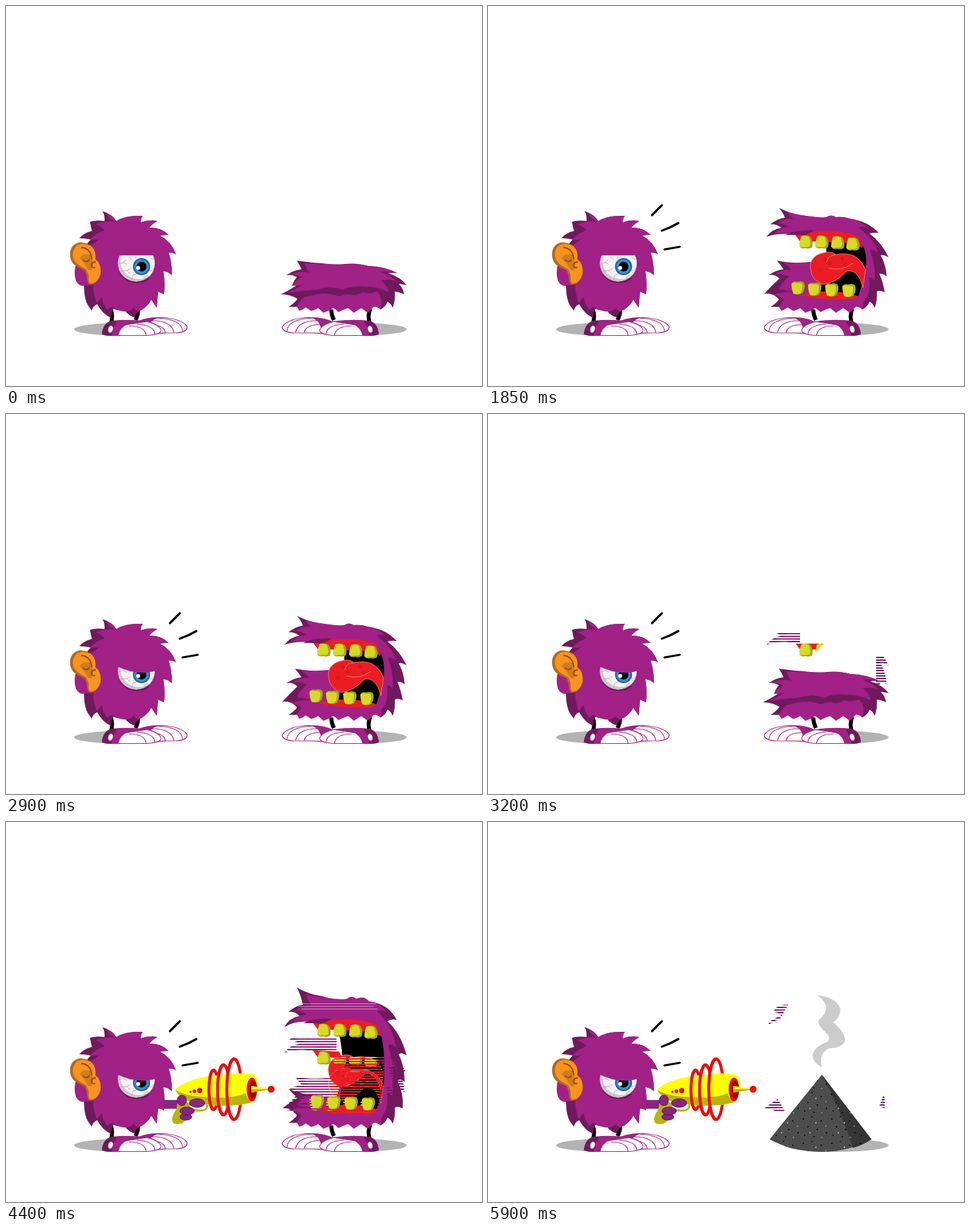
Animation, 720 px wide and 576 px high, one loop 6150 ms. Source, as an HTML page without scripts:

```html
<!DOCTYPE html>
<html lang="en">
<head>
<meta charset="utf-8">
<title>Shouting monsters</title>
<style>
html, body { margin: 0; width: 100%; height: 100%; overflow: hidden; background: #fff; }
svg { display: block; width: 720px; height: 576px; }

.fur { fill: #a22186; }
.dark { fill: #701a5e; }
.red { fill: #ed1c24; }
.olive { fill: #b7b40a; }
.line { fill: none; stroke: #a22186; stroke-width: 1.2; }
.leg { fill: none; stroke: #000; stroke-width: 6; }
.vein { fill: none; stroke: #e58a98; stroke-width: .8; }
.ring { fill: none; stroke: #ee0a0a; stroke-width: 4.500; }
.hand { fill: #8c2383; stroke: #571451; stroke-width: 1; }

.anim { animation: 6.15s step-end infinite; }
.cue { opacity: 0; }

#pupil { animation-name: look; }
#calm { animation-name: calm; }
#angry { animation-name: angry; }
#dashes, #trace { animation-name: shout; }
#gun { animation-name: draw; }
#shut { animation-name: shut; }
#half { animation-name: half; }
#open { animation-name: open; }
#feet { animation-name: feet; }
#blast { animation-name: blast; transform-origin: 0 0; }
#ash { animation-name: ash; }
#smoke { animation-name: smoke; }

@keyframes look {
  0%, 22.76% { transform: none; }
  8.13%, 17.88% { transform: translateX(-21px); }
  13% { transform: translateX(6px); }
}
@keyframes calm { 0% { opacity: 1; } 44.71% { opacity: 0; } }
@keyframes angry { 0% { opacity: 0; } 44.71%, 100% { opacity: 1; } }
@keyframes shout { 0% { opacity: 0; } 25.2%, 100% { opacity: 1; } }
@keyframes draw {
  0% { opacity: 0; transform: translateX(-130px); }
  59.34% { opacity: 1; transform: translateX(-130px); }
  61.78% { opacity: 1; transform: translateX(-104px); }
  64.22% { opacity: 1; transform: translateX(-78px); }
  66.66% { opacity: 1; transform: translateX(-52px); }
  69.1% { opacity: 1; transform: translateX(-26px); }
  71.54%, 100% { opacity: 1; transform: none; }
}
@keyframes shut {
  0%, 27.64%, 34.95%, 42.27%, 52.03%, 59.34%, 66.66% { opacity: 1; }
  22.76%, 30.08%, 37.39%, 47.15%, 54.47%, 61.78%, 69.1%, 100% { opacity: 0; }
}
@keyframes half {
  22.76%, 30.08%, 37.39%, 47.15%, 54.47%, 61.78%, 69.1% { opacity: 1; }
  0%, 25.2%, 32.52%, 39.83%, 49.59%, 56.91%, 64.22%, 71.54%, 100% { opacity: 0; }
}
@keyframes open {
  25.2%, 32.52%, 39.83%, 49.59%, 56.91%, 64.22%, 71.54% { opacity: 1; }
  0%, 27.64%, 34.95%, 42.27%, 52.03%, 59.34%, 66.66%, 75.6%, 100% { opacity: 0; }
}
@keyframes feet { 0% { opacity: 1; } 75.6%, 100% { opacity: 0; } }
@keyframes blast {
  0%, 83.73%, 100% { opacity: 0; }
  73.98% { opacity: 1; transform: scale(.6); }
  75.6% { opacity: 1; transform: none; }
  79.67% { opacity: 1; transform: scale(.8) rotate(12deg); }
}
@keyframes ash { 0% { opacity: 0; } 79.67%, 100% { opacity: 1; } }
@keyframes smoke {
  0% { opacity: 0; }
  83.73%, 91.86% { opacity: 1; transform: translateX(1028px) scaleX(-1); }
  87.8%, 95.93%, 100% { opacity: 1; transform: none; }
}
</style>
</head>
<body>
<svg viewBox="0 0 720 576" xmlns="http://www.w3.org/2000/svg">
<defs>
  <clipPath id="ball"><circle cx="197" cy="390" r="28"/></clipPath>

  <!-- striped afterimages of the last pose -->
  <pattern id="stripes" width="8" height="4" patternUnits="userSpaceOnUse"><path fill="#fff" d="M0 0H8V2H0Z"/></pattern>
  <mask id="echo" maskUnits="userSpaceOnUse" x="400" y="240" width="220" height="240">
    <path fill="url(#stripes)" d="M415 328H500V355H608V448H415Z"/>
  </mask>
  <mask id="fade" maskUnits="userSpaceOnUse" x="400" y="240" width="220" height="240">
    <path fill="url(#stripes)" d="M418 330H472V352H418ZM587 368H606V410H587Z"/>
    <path fill="#fff" d="M466 348H508L490 368H470Z"/>
  </mask>
  <mask id="scraps" maskUnits="userSpaceOnUse" x="400" y="240" width="220" height="240">
    <path fill="url(#stripes)" d="M418 310L438 277H454L442 298ZM416 436L436 416L450 440ZM590 436L598 414L606 418L598 438Z"/>
  </mask>

  <pattern id="grit" width="43" height="37" patternUnits="userSpaceOnUse">
    <g fill="#000">
      <circle cx="4" cy="6" r="1.1"/><circle cx="17" cy="3" r=".9"/><circle cx="31" cy="9" r="1.1"/>
      <circle cx="11" cy="18" r="1"/><circle cx="25" cy="22" r="1.1"/><circle cx="39" cy="27" r="1"/>
      <circle cx="6" cy="31" r="1"/><circle cx="20" cy="33" r="1.1"/>
    </g>
    <g fill="#ccc">
      <circle cx="23" cy="12" r="1"/><circle cx="38" cy="17" r=".8"/><circle cx="14" cy="27" r=".9"/><circle cx="32" cy="34" r=".8"/>
    </g>
  </pattern>

  <g id="back">
    <path class="leg" d="M200 460Q200 468 196 476" stroke-width="5"/>
    <path d="M194 484Q206 472 235 472Q266 474 274 486Q275 494 258 495.500L200 496Z" fill="#fff" stroke="#a22186" stroke-width="1.2"/>
    <path class="fur" d="M192 482Q205 472 231 472Q218 476 216 487L192 490Z"/>
    <path class="line" d="M226 473Q266 474 267 493M220 477Q251 477 254 495M217 483Q239 483 241 495"/>
  </g>
  <g id="front">
    <path class="leg" d="M158 459Q163 470 158 483"/>
    <path class="fur" d="M145 497Q147 480 160 477Q185 474 215 478Q234 483 235 492Q234 499 210 500L160 500Q148 500 145 497Z"/>
    <path class="dark" d="M145 497Q147 480 160 477Q165 477 168 479Q160 487 160 500Q148 500 145 497Z"/>
    <path d="M170 499Q173 488 181 484Q198 481 213 479Q233 484 234 492Q232 498 210 499Z" fill="#fff"/>
    <path class="line" d="M186 485Q210 485 212 499M198 482Q224 484 225 497"/>
    <ellipse cx="158" cy="490" rx="3.500" ry="5.500" fill="#ccc" transform="rotate(15 158 490)"/>
    <ellipse cx="158.600" cy="489" rx="2.600" ry="4" fill="#fff" transform="rotate(15 158 490)"/>
  </g>

  <g id="tooth">
    <path fill="#a4a81b" d="M-7 -9Q1 -12 7 -8Q12 1 9 8Q4 11 -1 9Q-7 11 -10 6Q-10 -2 -7 -9Z"/>
    <path fill="#d5db24" d="M-7 -9Q0 -11 4 -8Q8 0 6 6Q2 8 -2 7Q-7 9 -10 6Q-10 -2 -7 -9Z"/>
  </g>
  <g id="uppers">
    <path class="red" d="M464 346Q500 340 530 342Q556 345 562 352L566 366Q540 356 510 358Q490 356 472 357Z"/>
    <path class="dark" d="M450 347Q462 339 493 340Q482 349 465 347Z"/>
    <use href="#tooth" x="481" y="358"/><use href="#tooth" x="505" y="358"/>
    <use href="#tooth" x="529" y="359"/><use href="#tooth" x="552" y="361"/>
  </g>
  <g id="lowers">
    <path class="red" d="M473 438Q520 426 560 440Q557 446 540 445Q500 445 473 438Z"/>
    <g transform="scale(1 -1)">
      <use href="#tooth" x="469" y="-427"/><use href="#tooth" x="494" y="-429"/>
      <use href="#tooth" x="520" y="-430"/><use href="#tooth" x="546" y="-431"/>
    </g>
  </g>
  <g id="tongue">
    <path class="red" stroke="#f7796b" d="M488 400Q485 379 508 374Q520 371 526 377Q560 370 571 400L567 427Q560 398 542 402Q528 419 507 422Q490 416 488 400Z"/>
    <path fill="none" stroke="#f7796b" d="M526 377Q514 378 512 388M515 397Q535 403 552 390"/>
    <g fill="none" stroke="#b9121a"><circle cx="502" cy="400" r="2.500"/><circle cx="510" cy="384" r="2"/><circle cx="536" cy="383" r="2"/><circle cx="541" cy="392" r="2"/><circle cx="517" cy="391" r="2"/></g>
  </g>
  <g id="hem">
    <path class="fur" d="M588 433Q589 445 585 457Q581 449 577 448Q574 456 566 460Q560 455 556 456Q552 461 547 465Q541 460 537 458Q531 462 526 465Q520 459 517 458Q508 461 503 464Q498 459 495 458Q487 463 480 465Q475 460 472 458Q465 462 461 462Q456 458 453 457Q448 461 444 462Q441 458 440 456Q434 456 428 456Q437 450 441 444L441 433Z"/>
    <path class="dark" d="M588 433Q589 445 585 457Q581 449 577 448Q574 456 566 460Q570 448 567 433Z"/>
    <path class="dark" d="M428 456Q437 450 441 444L452 440Q444 448 440 456Z"/>
  </g>
  <polygon id="star" points="6,-140 24,-82 66,-118 62,-64 112,-66 82,-24 124,0 84,22 114,68 62,64 68,120 26,86 2,140 -24,86 -68,116 -62,66 -112,66 -82,22 -123,-2 -82,-26 -110,-70 -60,-66 -64,-118 -22,-84"/>
</defs>

<g fill="#b3b3b3">
  <ellipse cx="182" cy="490" rx="79" ry="10"/>
  <ellipse cx="527" cy="490" rx="79" ry="10"/>
</g>

<!-- ray gun, hidden behind the listener until drawn -->
<g id="gun" class="anim cue">
  <path class="hand" d="M225 422H264V434H225Z"/>
  <g class="ring">
    <ellipse cx="314" cy="406" rx="7" ry="30"/><ellipse cx="329" cy="406" rx="9" ry="38"/><ellipse cx="345" cy="405" rx="11" ry="46"/>
  </g>
  <path class="olive" d="M260 420L258 435Q247 451 254 457Q265 460 271 453L280 427Z"/>
  <path fill="none" stroke="#b7b40a" stroke-width="3" d="M281 436Q309 442 304 424"/>
  <path fill="#ff0" d="M256 405Q275 388 320 384Q355 379 372 382Q383 387 381 405Q381 421 368 427Q330 432 300 428Q265 425 256 405Z"/>
  <path class="olive" d="M256 406Q272 416 305 417Q345 420 362 411Q366 422 372 425Q340 433 300 428Q265 425 256 406Z"/>
  <g class="ring">
    <path d="M314 376A7 30 0 0 0 314 436M329 368A9 38 0 0 0 329 444M345 359A11 46 0 0 0 345 451"/>
  </g>
  <ellipse cx="372" cy="405.500" rx="8" ry="18" fill="#e30613"/>
  <ellipse cx="374" cy="405.500" rx="5" ry="13" fill="#8f0d12"/>
  <path fill="#ff0" d="M371 400L397 404V406L371 410Z"/>
  <path class="olive" d="M371 405H397V406L371 410Z"/>
  <circle cx="401" cy="405" r="5.300" fill="#ee0a0a"/>
  <g fill="#ee0a0a"><circle cx="279" cy="409" r="1.800"/><circle cx="285" cy="408" r="2.700"/><circle cx="293" cy="407" r="4"/></g>
  <g class="hand">
    <ellipse cx="266" cy="422" rx="7" ry="8"/><ellipse cx="289" cy="426" rx="11.500" ry="6.500"/>
    <ellipse cx="272" cy="447" rx="9" ry="5"/><ellipse cx="274" cy="438" rx="11" ry="6"/>
  </g>
</g>

<!-- listener -->
<use href="#back"/>
<use href="#front"/>
<path class="dark" d="M146 311Q160 315 167 326Q180 317 207 318Q203 323 204 328Q216 323 229 326Q220 331 217 336Q234 335 246 347Q238 347 233 348Q250 357 257 376Q250 373 246 374Q251 388 251 408Q245 402 238 402Q241 420 239 437Q233 434 230 433Q229 446 228 457Q222 449 220 445Q213 458 200 463Q196 466 195 472Q186 470 181 463Q170 462 163 459Q158 464 159 473Q146 467 138 452Q131 455 130 462Q122 452 121 447Q118 438 118 424Q105 425 104 405Q105 385 113 372Q120 363 128 354Q120 352 111 352Q117 344 130 341Q128 333 127 327Q137 324 149 326Q150 318 146 311Z"/>
<path class="fur" d="M153 315Q161 318 167 326Q180 317 207 318Q203 323 204 328Q216 323 229 326Q220 331 217 336Q234 335 246 347Q238 347 233 348Q250 357 257 376Q250 373 246 374Q251 388 251 408Q245 402 238 402Q241 420 239 437Q233 434 230 433Q229 446 228 457Q222 449 220 445Q213 458 200 463Q196 462 194 458Q187 463 181 463Q170 462 160 456Q155 458 154 461Q146 453 145 441Q140 446 138 451Q132 439 132 422Q125 423 118 424Q105 425 104 405Q105 385 113 372Q128 364 143 352Q138 355 127 354Q137 344 149 340Q144 334 136 331Q149 325 166 327Q153 322 153 315Z"/>

<path class="dark" d="M171 405Q184 424 208 419Q214 417 218 412Q201 417 171 405Z"/>
<g clip-path="url(#ball)">
  <circle cx="197" cy="390" r="28" fill="#cbc8cd"/>
  <circle cx="201" cy="386" r="28" fill="#f5f3f5"/>
  <path class="vein" d="M170 391L178 389L183 392M178 389L181 384M174 402L183 401L187 406M183 401L188 398M190 415L192 408L198 406M210 416L209 411L215 408M225 397L219 402L217 399M224 384L218 382M185 380L190 384M197 379L195 383"/>
  <g id="pupil" class="anim">
    <circle cx="205" cy="395" r="13" fill="#1c6cb0"/>
    <circle cx="205" cy="395" r="10.500" fill="#3d92cf"/>
    <circle cx="205" cy="395" r="7.500"/>
    <circle cx="200" cy="397" r="3" fill="#fff"/>
  </g>
</g>
<path id="calm" class="fur anim" d="M167 355H228V378H167Z"/>
<path id="angry" class="fur anim cue" d="M167 355H228V389Q199 398 167 382Z"/>

<path fill="#b36a1b" d="M97 378C96 363 108 356 118 359C133 361 137 374 135 384C142 388 144 398 143 406C140 418 132 424 126 422C121 419 124 410 119 401C112 396 98 395 97 378Z"/>
<path fill="#f7931e" d="M101 376C102 363 112 359 120 361C133 363 137 374 135 384C142 388 144 398 143 406C140 416 133 422 127 420C123 417 128 409 121 399C113 394 101 390 101 376Z"/>
<path fill="#d07c1b" d="M111 382Q117 374 127 377Q134 387 130 400Q125 402 122 396Q118 388 111 382Z"/>
<path fill="none" stroke="#8d4b12" stroke-width="2" d="M114 366Q128 367 130 384M116 385Q124 390 126 384M136 388Q128 388 130 395Q132 398 135 396"/>

<g id="dashes" class="anim cue" fill="none" stroke="#000" stroke-width="3.200" stroke-linecap="round">
  <path d="M248 317L263 302M263 340.500Q276 336 288 329M267 369L290 365"/>
</g>

<!-- shouter -->
<g id="feet" class="anim">
  <use href="#back" transform="matrix(-1 0 0 1 692 0)"/>
  <use href="#front" transform="matrix(-1 0 0 1 709 0)"/>
</g>

<g id="shut" class="anim">
  <g id="trace" class="anim cue"><use href="#mid" mask="url(#fade)"/></g>
  <use href="#hem"/>
  <path class="dark" d="M440 386Q460 389 478 390Q500 393 513 391Q530 389 548 394Q575 395 592 405Q583 404 578 405Q597 411 606 423Q600 422 594 421Q601 428 602 437Q594 433 588 433Q589 445 585 454Q577 446 567 445Q567 437 561 433Q549 437 540 434Q530 439 523 438Q514 435 504 440Q487 434 470 437L441 444Q430 437 416 437Q428 431 439 424Q428 426 440 411Q432 406 424 408Q436 400 447 399Q444 392 440 386Z"/>
  <path class="fur" d="M452 390Q480 391 513 392Q530 389 548 394Q575 396 590 404Q576 401 566 403Q582 408 590 417Q578 413 567 416Q577 424 579 434Q562 425 540 425Q520 424 509 430Q490 423 470 430Q450 431 425 435Q438 429 448 423Q440 424 432 424Q437 417 447 411Q438 407 430 407Q444 401 459 404Q452 396 452 390Z"/>
</g>

<g id="half" class="anim cue">
  <g id="mid">
    <use href="#hem"/>
    <path class="dark" d="M440 306Q460 316 480 318Q500 322 512 320Q518 315 526 320Q538 319 546 322Q575 326 591 344Q582 343 577 345Q595 358 606 381Q598 376 594 378Q602 392 603 410Q597 405 592 406Q598 420 600 434Q592 430 588 433L585 446H441Q432 434 418 436Q429 424 441 413Q433 406 424 408Q436 400 447 399Q443 393 437 386Q460 391 489 388L512 376V358L465 347Q440 343 421 350Q430 338 444 336Q435 330 427 331Q438 322 449 321Q446 312 440 306Z"/>
    <path class="fur" d="M453 313Q480 319 512 321Q518 315 526 320Q538 319 546 322Q562 325 574 336Q566 333 560 336Q584 352 590 374Q583 368 578 370Q587 395 585 417Q580 410 576 412Q580 435 568 448H450Q442 439 432 438Q450 430 478 436L440 429Q444 419 456 410Q442 405 433 407Q446 398 459 400Q453 393 447 389Q470 391 489 388L512 376V358L465 347Q445 343 433 345Q440 336 455 335Q446 329 438 329Q449 321 462 323Q456 318 453 313Z"/>
    <path d="M511 357Q545 352 568 365Q576 385 568 415L560 440L500 438Q515 400 511 357Z"/>
    <use href="#uppers"/>
    <use href="#tongue"/>
    <use href="#lowers"/>
  </g>
</g>

<g id="open" class="anim cue">
  <g id="wide">
    <use href="#hem"/>
    <path class="dark" d="M440 251Q460 262 478 264Q500 271 516 268Q522 262 530 268Q542 263 549 272Q578 275 591 300Q583 298 577 302Q597 320 606 354Q598 348 594 352Q603 370 603 394Q597 388 592 392Q602 412 600 434Q592 430 588 433L585 446H441Q432 432 418 434Q430 425 441 418Q433 412 428 405Q450 414 480 416L500 417L512 380L505 318L465 304Q440 299 421 311Q428 297 444 294Q436 286 427 288Q438 278 449 277Q446 262 440 251Z"/>
    <path class="fur" d="M453 261Q482 268 516 269Q522 262 530 268Q542 263 549 272Q566 274 576 288Q567 284 561 287Q586 310 590 342Q583 335 578 338Q588 370 585 407Q580 400 576 403Q580 432 568 448H449Q441 436 432 437Q446 427 470 431Q452 423 440 428Q445 420 456 418L500 417L512 380L505 318L465 304Q445 299 433 303Q440 293 455 292Q446 285 438 286Q449 277 462 278Q456 269 453 261Z"/>
    <path d="M502 314Q545 308 568 325Q577 370 568 410L560 436L500 436Q518 375 502 314Z"/>
  </g>
  <use href="#uppers" y="-42"/>
  <use href="#tongue" y="-20"/>
  <use href="#mid" mask="url(#echo)"/>
  <path fill="#fff" opacity=".5" d="M445 275H560V276H445ZM442 279H556V280H442ZM447 283H562V284H447Z"/>
  <path class="red" d="M464 346L504 348L508 357H472Z"/>
  <use href="#tooth" x="481" y="358"/>
  <use href="#lowers" x="2" y="-4"/>
</g>

<!-- what is left -->
<g id="ash" class="anim cue">
  <use href="#wide" mask="url(#scraps)"/>
  <path fill="#4d4d4d" d="M505 383L580 481Q545 500 505 500Q460 500 426 481Z"/>
  <path fill="#363636" d="M505 383L580 481Q567 490 552 494Q535 440 505 383Z"/>
  <path fill="url(#grit)" d="M505 383L580 481Q545 500 505 500Q460 500 426 481Z"/>
</g>
<path id="smoke" class="anim cue" fill="#ccc" d="M498 262Q532 268 533 286Q531 298 522 304Q540 318 540 331Q537 342 516 343Q500 350 505 371Q492 366 491 353Q494 340 512 334Q520 328 512 320Q498 308 500 300Q513 290 511 278Q508 270 498 262Z"/>

<g transform="translate(508 377)">
  <g id="blast" class="anim cue">
    <use href="#star" fill="#ee0a0a"/>
    <use href="#star" fill="#ff0" transform="scale(.8)"/>
    <use href="#star" fill="#fff" transform="scale(.4)"/>
  </g>
</g>
</svg>
</body>
</html>
```
